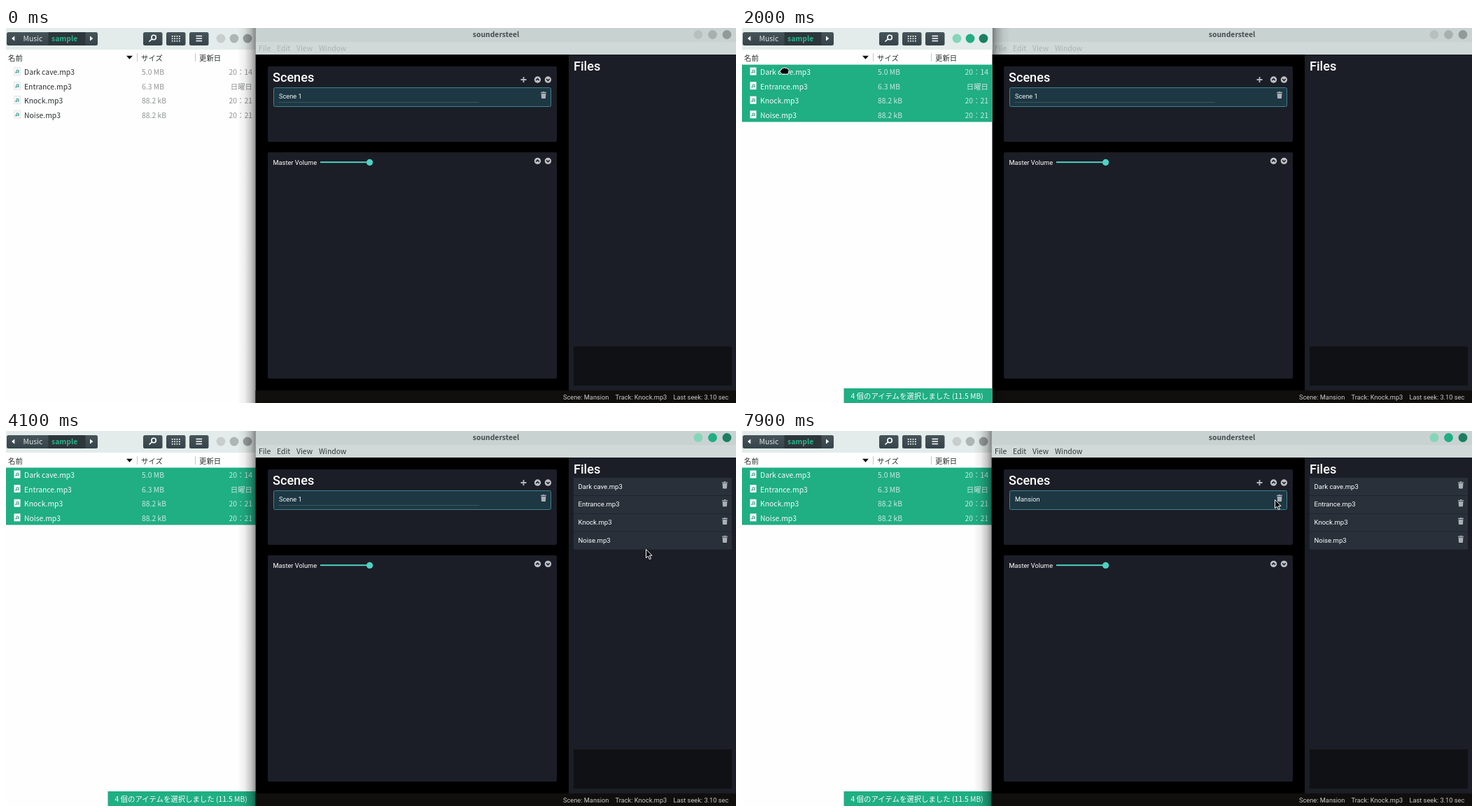
Animation of 1043x537 px, one loop 8 s. Source, as an HTML page:

```html
<!DOCTYPE html>
<html lang="en">
<head>
<meta charset="utf-8">
<title>Adding files to a scene</title>
<style>
html, body { margin: 0; width: 100%; height: 100%; overflow: hidden; background: #000; }
svg { display: block; width: 1043px; height: 537px; }
text { white-space: pre; }
.gtk { font-family: "Noto Sans CJK JP", "Noto Sans CJK", "Noto Sans", sans-serif; }
.app { font-family: Roboto, sans-serif; }
</style>
</head>
<body>
<svg viewBox="0 0 1043 537">
  <defs>
    <linearGradient id="shade">
      <stop offset="0" stop-opacity=".42"/>
      <stop offset=".25" stop-opacity=".22"/>
      <stop offset=".6" stop-opacity=".06"/>
      <stop offset="1" stop-opacity="0"/>
    </linearGradient>
    <linearGradient id="button" x2="0" y2="1">
      <stop stop-color="#46545a"/><stop offset="1" stop-color="#36434a"/>
    </linearGradient>
  </defs>
  <g id="stage"></g>
</svg>
<script>
const LOOP = 8000, STEP = 100;
const GREEN = '#20ae83', PANEL = '#1b1e26', LIVE = ['#85d5b9', GREEN, '#1a7f60'];
const FILES = [
  ['Dark cave.mp3', '5.0 MB', '20：14'],
  ['Entrance.mp3', '6.3 MB', '日曜日'],
  ['Knock.mp3', '88.2 kB', '20：21'],
  ['Noise.mp3', '88.2 kB', '20：21']
];

// Pointer: time, x, y, shape (kept until the next key)
const PATH = [
  [600, 258, 515, 'arrow'], [1000, 210, 295, 'arrow'], [1300, 210, 295, 'arrow'],
  [1800, 60, 61, 'arrow'], [2000, 61, 63, 'hand'], [2100, 92, 68, 'hand'],
  [2400, 760, 146, 'hand'], [2500, 910, 140, 'hand'], [2600, 966, 128, 'hand'],
  [2800, 966, 128, 'copy'], [3200, 963, 122, 'arrow'], [3500, 963, 122, 'arrow'],
  [3700, 924, 187, 'arrow'], [4000, 924, 187, 'arrow'], [4100, 914, 169, 'arrow'],
  [4500, 735, 108, 'arrow'], [4900, 649, 82, 'arrow'], [5000, 650, 99, 'beam'],
  [5300, 650, 94, 'beam'], [7700, 650, 94, 'beam'], [7800, 718, 106, 'arrow'],
  [7900, 761, 98, 'arrow'], [8000, 761, 98, 'arrow']
];
// Scene name: time, text, caret x (0 = hidden)
const TYPING = [
  [0, 'Scene 1', 0], [5500, 'Scene 1', 423], [6000, 'Scene 1', 0], [6400, 'M', 397.5],
  [6600, 'Ma', 402.8], [6700, 'Man', 408], [6800, 'Mans', 412.8],
  [7000, 'Mansi', 415], [7300, 'Mansion', 425.5], [7600, 'Mansion', 0]
];

const rect = (x, y, w, h, fill, more = '') =>
  `<rect x="${x}" y="${y}" width="${w}" height="${h}" fill="${fill}" ${more}/>`;
const dot = (x, y, r, fill) => `<circle cx="${x}" cy="${y}" r="${r}" fill="${fill}"/>`;
const path = (d, fill, stroke = 'none', width = 1, more = '') =>
  `<path d="${d}" fill="${fill}" stroke="${stroke}" stroke-width="${width}" ${more}/>`;
const text = (cls, size) => (x, y, s, fill = '#fff', more = '') =>
  `<text class="${cls}" x="${x}" y="${y}" font-size="${size}" fill="${fill}" ${more}>${s}</text>`;
const at = (x, y, body) => `<g transform="translate(${x} ${y})">${body}</g>`;
const gtk = text('gtk', 10.4), app = text('app', 9.25), item = text('app', 9.55), head = text('app', 18.1);
const lastKey = (keys, t) => keys.filter(k => k[0] <= t).pop();

const buttons = (xs, y, colors) => xs.map((x, i) => dot(x, y, 6.4, colors[i])).join('');

function leftWindow(s) {
  const ink = s.selected ? '#f4fbf8' : '#2b2f31', dim = s.selected ? '#c9eadf' : '#8f9394';
  let out = rect(0, 0, 357.5, 537, '#fefefe') + rect(0, 0, 357.5, 31, '#e3ecea');
  out += rect(1, 6, 130, 19, 'url(#button)', 'rx="2.5"') + rect(60.5, 6, 53, 19, '#2c363b');
  for (const x of [196, 229, 262]) out += rect(x, 6, 27.5, 19, 'url(#button)', 'rx="2.5"');
  out += path('M12.3 11.5 8 15l4.3 3.5zM120 11.5l4.3 3.5-4.3 3.5z', '#fff');
  out += gtk(24.5, 19.3, 'Music', '#dde3e4') + gtk(65, 19.3, 'sample', '#2bb38a', 'font-weight="700"');
  out += path('M208.7 15.7 204.5 19.5M214.3 13.5a3.2 3.2 0 1 1-6.4 0a3.2 3.2 0 1 1 6.4 0', 'none', '#fff', 1.6);
  for (let i = 0; i < 12; i++) out += rect(236.8 + i % 4 * 3.4, 11 + (i >> 2) * 3.4, 1.7, 1.7, '#fff');
  out += path('M271.5 11.5h8.6m-8.6 3.5h8.6m-8.6 3.5h8.6', 'none', '#fff', 1.7);
  out += buttons([307, 326, 345], 15, s.leftLive ? LIVE : ['#c9cdcd', '#afb4b4', '#989d9d']);
  out += gtk(3, 46.5, '名前', '#2b2f31') + gtk(193, 46.5, 'サイズ', '#2b2f31') + gtk(276, 46.5, '更新日', '#2b2f31');
  out += path('M172 39.8h9l-4.5 5z', '#111');
  out += rect(187, 36, 1, 12, '#c3c8c8') + rect(270, 36, 1, 12, '#c3c8c8');
  if (s.selected) out += rect(0, 52.5, 357.5, 82, GREEN);
  FILES.forEach(([name, size, date], i) => {
    const y = 67 + i * 20.6;
    out += at(11, y - 11, rect(.5, .5, 9, 11, s.selected ? '#fff' : '#f5f8f8', s.selected ? '' : 'stroke="#e3e8e8"') +
      path('M4 7.8V4.3h3v3', 'none', '#2d8f86', .9) + dot(3.4, 7.8, 1, '#2d8f86') + dot(6.4, 7.3, 1, '#2d8f86'));
    out += gtk(26, y, name, ink) + gtk(194, y, size, dim) + gtk(352, y, date, dim, 'text-anchor="end"');
  });
  if (s.tag) out += rect(145.5, 516, 212, 21, GREEN) + gtk(155.5, 531, '4 個のアイテムを選択しました (11.5 MB)');
  return out;
}

const trash = (x, y) => at(x, y, path('M-4-4.2h2.4l.7-.9h1.8l.7.9H4v1.2h-8zM-3.4-2.3h6.8L3 4.2q0 .9-.9.9h-4.2q-.9 0-.9-.9z', '#aab0b5'));
const chevrons = y => [[759.5, 1], [774.4, -1]].map(([x, d]) =>
  at(x, y, dot(0, 0, 4.7, '#bec1c4') + path(`M-2.3 ${d}L0 ${-1.3 * d}L2.3 ${d}`, 'none', PANEL, 1.6))).join('');

function sceneItem(t) {
  const [, name, caret] = lastKey(TYPING, t);
  let out = rect(382.5, 85.5, 396, 27, '#1d3743', 'rx="2" stroke="#44808f"');
  if (t < 5500) out += rect(389.5, 106, 286.5, 1, '#3b5460');
  if (t >= 6100 && t < 6400) out += rect(390, 92, 33, 12.5, GREEN);
  out += app(390, 101.4, name, '#f2f5f6');
  if (caret) out += rect(caret - .5, 92.5, 1, 11.5, '#fff');
  return out + trash(768, 96);
}

function rightWindow(t, s) {
  const menu = s.rightLive ? '#2f3737' : '#a9b3b2';
  let out = rect(356.5, 0, 687, 537, '#000') + rect(356.5, 0, 687, 20, '#c8d2d1') + rect(356.5, 20, 687, 18, '#d0d9d8');
  out += gtk(700, 13.4, 'soundersteel', '#464e4e', 'font-weight="700" text-anchor="middle"');
  out += buttons([989, 1009.5, 1030], 9.5, s.rightLive ? LIVE : ['#b7c0bf', '#a8b0af', '#929a99']);
  [['File', 361], ['Edit', 387], ['View', 415], ['Window', 447]].forEach(([m, x]) => out += gtk(x, 33.3, m, menu));
  out += rect(374, 55, 413, 108, PANEL, 'rx="2"') + rect(374, 178, 413, 324, PANEL, 'rx="2"');
  out += rect(804, 38, 239, 481, PANEL) + rect(811, 456, 226, 56, '#101115') + rect(356.5, 519, 687, 18, '#100f0e');
  out += head(381, 77.2, 'Scenes', '#fff', 'font-weight="500"') + head(811, 61.2, 'Files', '#fff', 'font-weight="500"');
  out += path('M735.5 74h8m-4-4v8', 'none', '#b4b7ba', 1.8) + chevrons(74) + chevrons(190.4);
  out += sceneItem(t);
  out += app(381.5, 195.6, 'Master Volume') + rect(449, 191.2, 71, 2, '#4fd1c5') + dot(519.6, 192.4, 4.6, '#4fd1c5');
  if (s.rightLive) FILES.forEach(([name], i) => {
    const y = 67 + i * 25.8;
    out += rect(811, y, 226, 25.2, '#29303a') + item(817.5, y + 15.6, name) + trash(1027, y + 10.4);
  });
  const grey = '#c9c9c8';
  return out + app(796, 531.7, 'Scene: Mansion', grey) + app(870.5, 531.7, 'Track: Knock.mp3', grey) +
    app(953.5, 531.7, 'Last seek: 3.10 sec', grey);
}

const HAND = path('M-6 1q-2-4 1-4q0-3 3-2.5q1-1.5 3 0q2-1 3 .8q2.5 0 2 3l-1 4.7h-8.5z', '#000', '#fff', 1);
const SHAPES = {
  arrow: path('M.5.5v12.2l2.9-2.6 2 4.6 2-.9-2-4.5h3.6z', '#000', '#fff', 1),
  hand: HAND,
  copy: HAND + rect(-.5, -1.5, 8.5, 8, '#fff') + path('M1.5 1v3.8h4.5M2 .5l3.5 3.5M2 .5h3', 'none', '#000', 1.1),
  beam: path('M-3-6h2.2L0-5.2.8-6H3M0-5.2V5.2M-3 6h2.2L0 5.2.8 6H3', 'none', '#000', 2.6) +
    path('M-3-6h2.2L0-5.2.8-6H3M0-5.2V5.2M-3 6h2.2L0 5.2.8 6H3', 'none', '#fff', 1.1)
};

function pointer(t) {
  const i = PATH.findLastIndex(k => k[0] <= t);
  if (i < 0) return '';
  const [t0, x0, y0, shape] = PATH[i], [t1, x1, y1] = PATH[i + 1];
  const p = (t - t0) / (t1 - t0);
  return at(x0 + (x1 - x0) * p, y0 + (y1 - y0) * p, SHAPES[shape]);
}

function draw(t) {
  const s = { selected: t >= 1200, tag: t >= 1400, leftLive: t >= 1200 && t < 3200, rightLive: t >= 3200 };
  const left = leftWindow(s), right = rightWindow(t, s);
  const shade = rect(0, 0, 26, 537, 'url(#shade)');
  const leftOnTop = t >= 1000 && t < 3200;
  return (leftOnTop
    ? right + at(357.5, 0, shade) + left
    : left + `<g transform="translate(356.5 0) scale(-1 1)">${shade}</g>` + right) + pointer(t);
}

const stage = document.getElementById('stage');
let shown = -1;
function tick(now) {
  const t = Math.floor(now % LOOP / STEP) * STEP;
  if (t !== shown) stage.innerHTML = draw(shown = t);
  requestAnimationFrame(tick);
}
tick(0);
</script>
</body>
</html>
```
